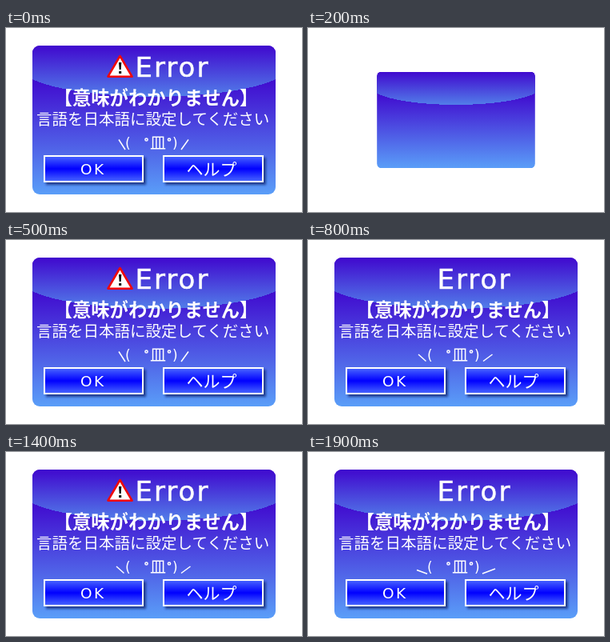
An HTML page for the animation above (2000 ms loop, 370 by 230 pixels).

```html
<!DOCTYPE html>
<html lang="ja">
<head>
<meta charset="utf-8">
<title>Error</title>
<style>
  html, body { margin: 0; width: 100%; height: 100%; overflow: hidden; background: #fff; }
  svg { display: block; width: 370px; height: 230px; }
  text { fill: #fff; font-family: "Noto Sans CJK JP", "Noto Sans CJK", "Noto Sans", sans-serif; }
  .latin { font-family: "DejaVu Sans", sans-serif; }
  .mid { text-anchor: middle; }
</style>
</head>
<body>
<svg viewBox="0 0 370 230">
  <defs>
    <linearGradient id="body" gradientUnits="userSpaceOnUse" x1="0" y1="62" x2="0" y2="208">
      <stop offset="0" stop-color="#4008ce"/><stop offset="1" stop-color="#5a9ef8"/>
    </linearGradient>
    <linearGradient id="gloss" gradientUnits="userSpaceOnUse" x1="0" y1="22" x2="0" y2="86">
      <stop offset="0" stop-color="#4008ce"/><stop offset="1" stop-color="#527ee9"/>
    </linearGradient>
    <linearGradient id="button" x1="0" y1="0" x2="0" y2="1">
      <stop offset="0" stop-color="#4a68ff"/>
      <stop offset=".5" stop-color="#0000ff"/>
      <stop offset="1" stop-color="#4a68ff"/>
    </linearGradient>
    <filter id="blur"><feGaussianBlur stdDeviation="1.5"/></filter>
    <clipPath id="stage"><rect x="25" y="15" width="320" height="200"/></clipPath>
    <clipPath id="round"><rect x="33" y="22" width="304" height="186" rx="9"/></clipPath>
  </defs>

  <g clip-path="url(#stage)">
    <g id="panel">
      <g clip-path="url(#round)" shape-rendering="crispEdges">
        <rect x="33" y="22" width="304" height="186" fill="url(#body)"/>
        <path d="M33 22H337V64A168 38 0 0 1 33 64Z" fill="url(#gloss)"/>
      </g>
    </g>
  </g>

  <g id="content">
    <g id="icon">
      <path d="M142.5 35L127.5 60.7H157.5Z" fill="#fff" stroke="#f00808" stroke-width="2.6" stroke-linejoin="round"/>
      <path d="M141 43H144.3L143.6 52H141.7Z"/>
      <rect x="141.2" y="54" width="3" height="3"/>
    </g>
    <text class="latin" x="161.5" y="61" font-size="34" letter-spacing="2" stroke="#fff" stroke-width=".5">Error</text>
    <text class="mid" x="187.5" y="96" font-size="23.3" font-weight="700">【意味がわかりません】</text>
    <text class="mid" x="183.7" y="120.5" font-size="19.5">言語を日本語に設定してください</text>

    <text class="latin" x="149" y="150" font-size="17">(</text>
    <text class="mid" x="190" y="151" font-size="20">皿</text>
    <text class="latin" x="208" y="150" font-size="17">)</text>
    <g fill="none" stroke="#fff" stroke-width="1.5">
      <circle cx="175.5" cy="139.5" r="1.6"/>
      <circle cx="204" cy="139.5" r="1.6"/>
      <path id="arms"/>
    </g>

    <g id="buttons"></g>
  </g>
</svg>
<script>
const STEP = 100, STEPS = 20, INTRO = 5;
const SCALES = [1, 0.3, 0.65, 1.1, 1];
const UP = "M141 139.5L149 152M228 139.5L219 152";
const HALF = "M138 143L147.5 151.5M230.5 143L219 151.5";
const DOWN = "M136 147.5L149 152.3M234 146L218 152";
const POSES = [UP, HALF, DOWN, HALF];
const [panel, content, icon, arms, buttons] =
  ["panel", "content", "icon", "arms", "buttons"].map(id => document.getElementById(id));

function button(x, width, label, attrs) {
  return `<rect x="${x + 3}" y="162" width="${width}" height="34" fill="#102070" opacity=".75" filter="url(#blur)"/>
    <rect x="${x + 1}" y="160" width="${width - 2}" height="32" fill="url(#button)" stroke="#fff" stroke-width="2"/>
    <text ${attrs}>${label}</text>`;
}
buttons.innerHTML =
  button(47, 125, "OK", 'class="latin" x="93" y="183.3" font-size="18.5" letter-spacing="2.5"') +
  button(196, 126, "ヘルプ", 'class="mid" x="257" y="183.5" font-size="21"');

const show = (node, on) => node.setAttribute("visibility", on ? "inherit" : "hidden");

function draw(step) {
  const intro = step > 0 && step < INTRO;
  const beat = step < INTRO ? 0 : (step - INTRO) % 4;
  const scale = SCALES[step] ?? 1;
  panel.setAttribute("transform", `translate(185 115) scale(${scale}) translate(-185 -115)`);
  show(content, !intro);
  show(icon, beat < 2);
  arms.setAttribute("d", POSES[beat]);
}

const start = performance.now();
function tick() {
  draw(Math.floor((performance.now() - start) / STEP) % STEPS);
  requestAnimationFrame(tick);
}
tick();
</script>
</body>
</html>
```
